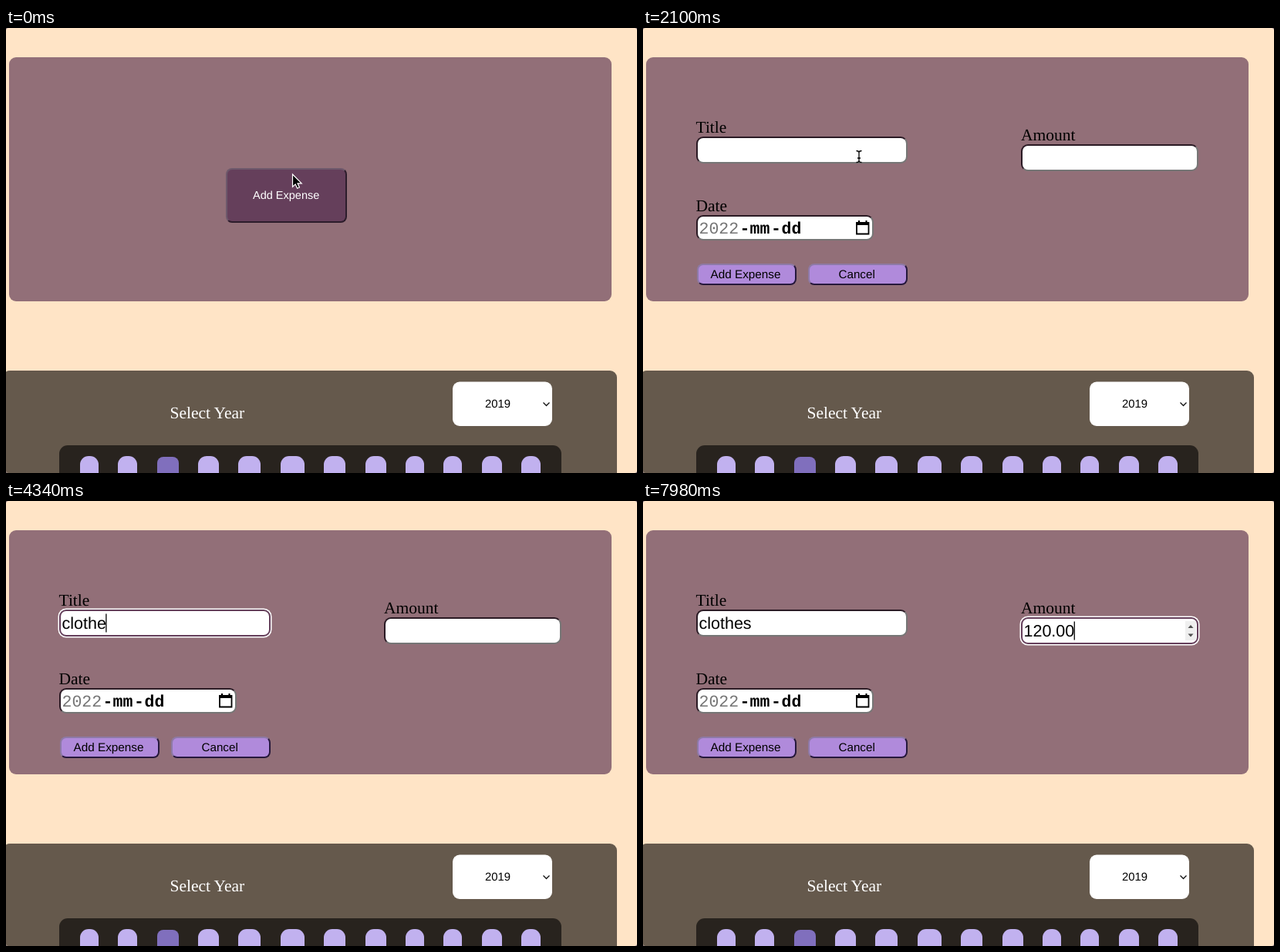
Write an HTML page that moves like this. It is 818 px wide and 578 px high and loops after 8000 ms.

```html
<!DOCTYPE html>
<html lang="en">
<head>
<meta charset="utf-8">
<title>Expense form</title>
<style>
html, body { margin: 0; width: 100%; height: 100%; overflow: hidden; background: #6b5a6e; }
#stage { position: relative; width: 818px; height: 578px; overflow: hidden; background: #ffe4c6; border-radius: 3px; }
#stage div, svg { position: absolute; box-sizing: border-box; }
svg { left: 0; top: 0; }
text { font: 21.5px "Liberation Serif", Times, serif; text-rendering: geometricPrecision; white-space: pre; }
.sans { font-family: "Liberation Sans", Arial, sans-serif; }
.mono { font-family: "Liberation Mono", Courier, monospace; }
.field { background: #fff; border: 2px solid; border-color: #2a1a24 #767676 #767676 #2a1a24; border-radius: 9px; }
.focus { border-color: #653f5b; box-shadow: 0 0 0 1.5px #fff; }
.small { background: #b08adb; border: 2px solid; border-color: #8e7aa6 #26183c #26183c #8e7aa6; border-radius: 8px; }
#add { background: #653f5b; border: 2px solid; border-color: #6d586b #2c1c2b #2c1c2b #6d586b; border-radius: 8px; }
#add.down { border-color: #2c1c2b #6d586b #6d586b #2c1c2b; }
</style>
</head>
<body>
<div id="stage">
  <svg id="art" width="818" height="578">
    <rect x="4" y="38" width="781" height="317" rx="9" fill="#926f78"/>
    <rect x="-4" y="445" width="796" height="160" rx="9" fill="#65594c"/>
    <rect x="69" y="542" width="651" height="60" rx="11" fill="#28231e"/>
    <g id="bars"></g>
    <rect x="579" y="459.5" width="129" height="57.5" rx="9" fill="#fff"/>
    <path d="M696.5 486.5l4 4 4-4" fill="none" stroke="#111" stroke-width="1.3"/>
    <text class="sans" x="621" y="493" style="font-size:14.8px">2019</text>
    <text x="212.5" y="507" fill="#fff">Select Year</text>
  </svg>
  <div id="add"></div>
  <div id="form" style="left:0;top:0">
    <div id="titleBox" class="field" style="left:69px;top:141px;width:274px;height:35px"></div>
    <div id="amountBox" class="field" style="left:490px;top:151px;width:230px;height:35px"></div>
    <div class="field" style="left:69px;top:243px;width:230px;height:33px"></div>
    <div class="small" style="left:70px;top:306px;width:129px;height:28px"></div>
    <div class="small" style="left:214px;top:306px;width:129px;height:28px"></div>
  </div>
  <svg width="818" height="578">
    <text id="addLabel" class="sans" x="320" y="221.5" fill="#fff" style="font-size:14.5px">Add Expense</text>
    <g id="formText">
      <text x="68.5" y="136">Title</text>
      <text x="490" y="146">Amount</text>
      <text x="68.5" y="238">Date</text>
      <text class="mono" x="72.5" y="267" fill="#757575">2022</text>
      <g font-weight="bold">
        <text class="mono" x="125.5" y="267" style="font-weight:bold">-</text>
        <text class="mono" x="138.5" y="267" style="font-weight:bold">mm</text>
        <text class="mono" x="166" y="267" style="font-weight:bold">-</text>
        <text class="mono" x="179.5" y="267" style="font-weight:bold">dd</text>
      </g>
      <path d="M277 253h15.5v14.5H277z" fill="none" stroke="#000" stroke-width="1.8"/>
      <path d="M276.5 252h16.5v4h-16.5zM279 250h2v3h-2zM288.500 250h2v3h-2z"/>
      <text class="sans" x="87.500" y="325" style="font-size:15.3px">Add Expense</text>
      <text class="sans" x="253.500" y="325" style="font-size:15.2px">Cancel</text>
      <text id="title" class="sans" x="72.5" y="166"></text>
      <text id="amount" class="sans" x="493.5" y="176"></text>
      <g id="spinner">
        <path d="M703 156h14v25h-14z" fill="#efefef"/>
        <path d="M706.500 165l3.500-4 3.500 4zM706.500 172.500l3.500 4 3.500-4z" fill="#505050"/>
      </g>
      <path id="caret" d="M0 0v24" stroke="#000" stroke-width="1.3"/>
    </g>
    <path id="arrow" d="M0 0V16.300L3.700 12.900 6.100 18.200 8.900 17 6.500 11.800H11.700Z" stroke="#fff" stroke-width="1.200"/>
    <g id="beam" fill="none">
      <path d="M-3.500-7.500Q0-7.500 0-5Q0-7.500 3.500-7.500M0-5V5M-3.500 7.500Q0 7.500 0 5Q0 7.500 3.500 7.500M-2 2H2" stroke="#000" stroke-width="1.300"/>
    </g>
  </svg>
</div>
<script>
const $ = id => document.getElementById(id);
const LOOP = 8000;

// Bars as [left, width]; the third is the darker one
const bars = [[96, 24], [145, 25], [196, 28], [249, 27], [301, 29], [356, 31],
  [412, 28], [466, 27], [518, 24], [567, 24], [617, 26], [668, 25]];
$('bars').innerHTML = bars.map(([x, w], i) =>
  `<rect x="${x}" y="${i === 2 ? 557 : 556}" width="${w}" height="50" rx="${i === 2 ? 8 : 11}" fill="${i === 2 ? '#806fbd' : '#c1b1ef'}"/>`).join('');

// Pointer steps: [time, x, y, shape]
const pointer = [
  [0, 371.5, 190, 'arrow'], [140, 384, 200.5, 'arrow'],
  [980, 385, 191, 'arrow'], [1050, 379, 200, 'arrow'], [1120, 360, 217, 'arrow'], [1190, 348, 224, 'arrow'],
  [1820, 345, 219, 'arrow'], [1890, 335, 206, 'arrow'], [1960, 318, 191, 'arrow'], [2030, 300, 179, 'arrow'],
  [2100, 280, 167, 'beam'], [2170, 261, 157, 'beam'], [2240, 248, 154, 'beam'], [2310, 245, 157, 'beam'],
  [3290, 245, 157, ''],
  [4830, 252, 157, 'beam'], [4900, 302, 160, 'beam'], [4970, 390, 165, 'arrow'], [5040, 475, 166, 'arrow'],
  [5110, 550, 170, 'beam'], [5180, 579, 168.5, 'beam'], [5320, 579, 169.5, 'beam'],
  [6580, 579, 169.5, '']
];
const titleKeys = [3290, 3430, 3640, 3990, 4200, 4340, 4620];
const amountKeys = [6580, 6930, 7070, 7560, 7840, 7980];
const caretSpans = [[2590, 3080], [3290, 5110], [5530, 6090], [6580, LOOP]];

const typed = (text, keys, t) => text.slice(0, keys.filter(k => k <= t).length);
const show = (id, on) => $(id).style.display = on ? '' : 'none';
const move = (id, x, y) => $(id).setAttribute('transform', `translate(${x} ${y})`);

function draw(t) {
  const open = t >= 1470, down = t >= 1400;
  show('add', !open);
  show('addLabel', !open);
  show('form', open);
  show('formText', open);
  const nudge = down ? 0 : 1;
  $('add').className = down ? 'down' : '';
  $('add').style.cssText += `;left:${284 + nudge}px;top:${181 + nudge}px;width:157px;height:71px`;

  const inAmount = t >= 5530;
  $('titleBox').classList.toggle('focus', t >= 2590 && !inAmount);
  $('amountBox').classList.toggle('focus', inAmount);
  $('title').textContent = typed('clothes', titleKeys, t);
  $('amount').textContent = typed('120.00', amountKeys, t);
  show('spinner', t >= 5110);

  const caretOn = caretSpans.some(([a, b]) => t >= a && t < b);
  show('caret', caretOn);
  if (caretOn) {
    const field = $(inAmount ? 'amount' : 'title');
    const end = field.textContent ? field.getComputedTextLength() : 0.5;
    move('caret', (inAmount ? 493.5 : 72.5) + end, inAmount ? 156.5 : 146.5);
  }

  const [, x, y, shape] = pointer.filter(p => p[0] <= t).pop();
  for (const id of ['arrow', 'beam']) {
    show(id, id === shape);
    move(id, x, y);
  }
}

function tick() {
  draw(performance.now() % LOOP);
  requestAnimationFrame(tick);
}
tick();
</script>
</body>
</html>
```
